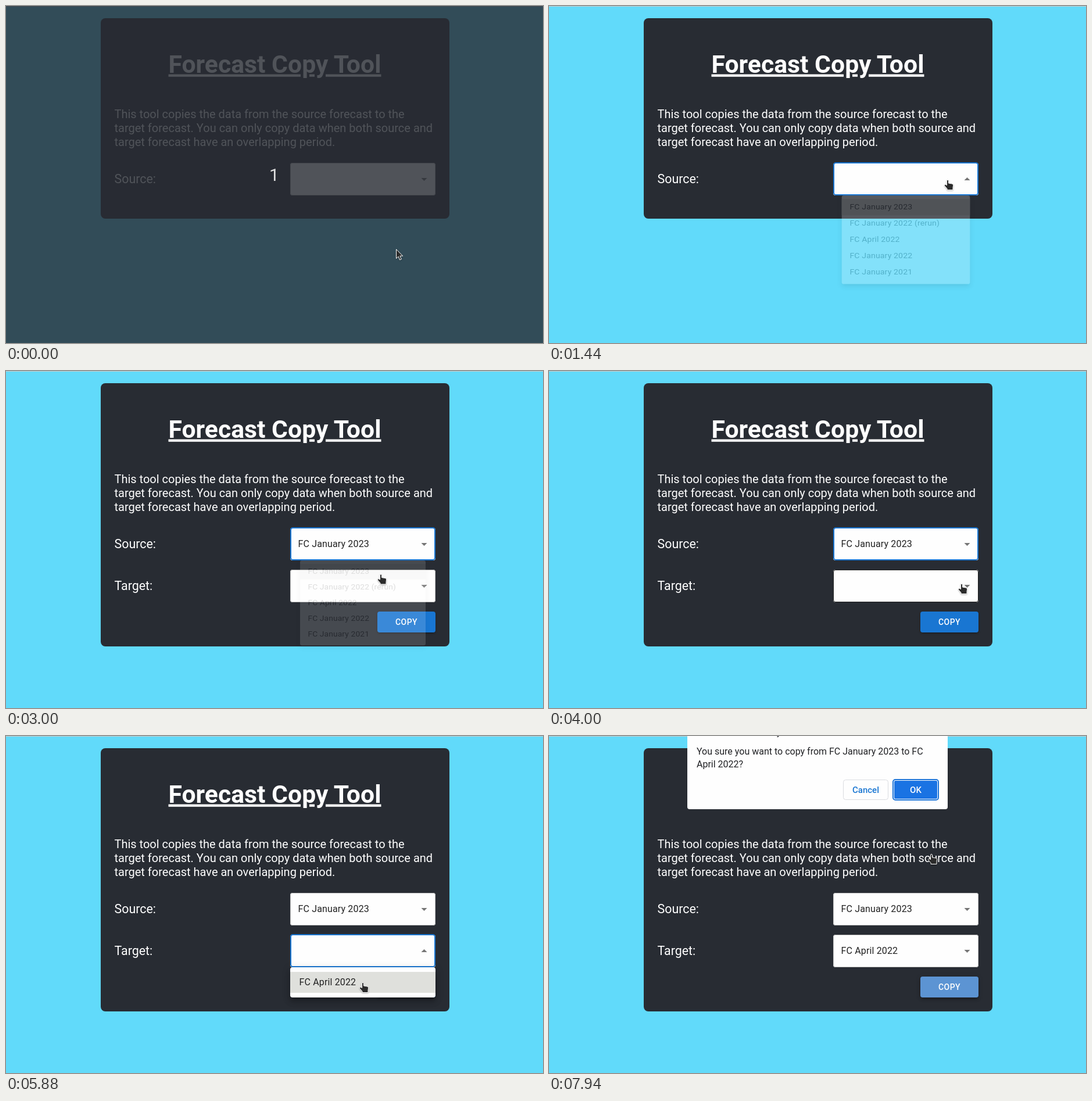
These frames come from a looping animation (924x580 px, 8000 ms). An HTML page:

```html
<!DOCTYPE html>
<html lang="en">
<head>
<meta charset="utf-8">
<title>Forecast Copy Tool</title>
<style>
  html, body { margin: 0; width: 100%; height: 100%; overflow: hidden; background: #61dafa; }
  svg { display: block; width: 924px; height: 580px; font-family: Roboto, sans-serif; }
  text { white-space: pre; }
  .field { font-size: 16px; letter-spacing: .15px; fill: #212121; }
  .label { font-size: 21.4px; fill: #fefefe; }
  .medium { font-weight: 500; }
</style>
</head>
<body>
<svg id="stage" viewBox="0 0 924 580" xmlns="http://www.w3.org/2000/svg"></svg>
<script>
const TICK = 62.5, LOOP = 8000;
const NS = 'http://www.w3.org/2000/svg';
const stage = document.getElementById('stage');

function add(parent, tag, attrs = {}, content) {
  const el = document.createElementNS(NS, tag);
  set(el, attrs);
  if (content) el.textContent = content;
  parent.appendChild(el);
  return el;
}
function set(el, attrs) {
  for (const k in attrs) el.setAttribute(k, attrs[k]);
}
const show = (el, on) => set(el, { visibility: on ? 'visible' : 'hidden' });
const group = (parent = stage) => add(parent, 'g');
const rect = (p, x, y, width, height, fill, rx = 0, more = {}) =>
  add(p, 'rect', { x, y, width, height, fill, rx, ...more });
const text = (p, x, y, str, attrs) => add(p, 'text', { x, y, ...attrs }, str);

// Each layer: y offset, blur, spread, alpha
function shadow(p, x, y, w, h, layers) {
  for (const [dy, blur, grow, alpha] of layers)
    rect(p, x - grow, y + dy - grow, w + 2 * grow, h + 2 * grow, '#000', 4,
      { opacity: alpha, style: `filter:blur(${blur / 2}px)` });
}

function bezier(x1, y1, x2, y2) {
  const at = (a, b, s) => 3 * a * s * (1 - s) ** 2 + 3 * b * s * s * (1 - s) + s ** 3;
  return x => {
    if (x <= 0) return 0;
    if (x >= 1) return 1;
    let lo = 0, hi = 1;
    for (let i = 0; i < 24; i++) {
      const mid = (lo + hi) / 2;
      if (at(x1, x2, mid) < x) lo = mid; else hi = mid;
    }
    return at(y1, y2, lo);
  };
}
const ease = bezier(.4, 0, .2, 1);
const clamp = v => Math.max(0, Math.min(1, v));

// Page and card
rect(stage, 0, 0, 924, 580, '#61dafa');
rect(stage, 0, 0, 924, 1, '#c8cbcb');
const card = rect(stage, 163, 21, 600, 345, '#282c33', 8);
text(stage, 462.5, 114.5, 'Forecast Copy Tool', {
  'font-size': 42.7, 'font-weight': 700, fill: '#fefefe',
  'text-anchor': 'middle', 'text-decoration': 'underline'
});
[
  'This tool copies the data from the source forecast to the',
  'target forecast. You can only copy data when both source and',
  'target forecast have an overlapping period.'
].forEach((line, i) => text(stage, 186.5, 193 + 24 * i, line, { 'font-size': 20, fill: '#fefefe' }));

function makeSelect(parent, y, label, value) {
  text(parent, 186.5, y + 35, label, { class: 'label' });
  rect(parent, 489, y, 250, 56, '#fefefe', 4);
  const border = rect(parent, 489.5, y + .5, 249, 55, 'none', 3.5);
  const caption = text(parent, 502.5, y + 33, value, { class: 'field' });
  const arrow = add(parent, 'path', { d: 'M-5-2.5h10l-5 5z', fill: '#757575' });
  return ({ focus, hover, open, filled }) => {
    set(border, focus
      ? { x: 490, y, width: 248, height: 55, stroke: '#1976d2', 'stroke-width': 2 }
      : { x: 489.5, y: y + .5, width: 249, height: 55, stroke: hover ? '#212121' : '#c4c4c4', 'stroke-width': 1 });
    show(caption, filled);
    set(arrow, { transform: `translate(719.5 ${y + (open ? 27.5 : 28.5)}) rotate(${open ? 180 : 0})` });
  };
}
const sourceSelect = makeSelect(stage, 270, 'Source:', 'FC January 2023');
const targetRow = group();
const targetSelect = makeSelect(targetRow, 342, 'Target:', 'FC April 2022');

// Copy button
const restShadow = group(targetRow), hoverShadow = group(targetRow);
shadow(restShadow, 639, 414, 100, 36, [[3, 1, -2, .2], [2, 2, 0, .14], [1, 5, 0, .12]]);
shadow(hoverShadow, 639, 414, 100, 36, [[2, 4, -1, .2], [4, 5, 0, .14], [1, 10, 0, .12]]);
const button = rect(targetRow, 639, 414, 100, 36, '#1976d2', 4);
const clip = add(add(stage, 'defs'), 'clipPath', { id: 'button' });
rect(clip, 639, 414, 100, 36, '#000', 4);
const ripple = add(add(targetRow, 'g', { 'clip-path': 'url(#button)' }), 'circle',
  { cx: 687, cy: 424, fill: '#fff' });
text(targetRow, 689, 437, 'COPY', {
  class: 'medium', 'font-size': 14, 'letter-spacing': .4, fill: '#fefefe', 'text-anchor': 'middle'
});

// Dropdown menus
function makeMenu(y, items, [openAt, closeAt], firstClosing) {
  const h = items.length * 36 + 16;
  const c = h / 36, span = (4 + 15 * c ** .25 + c / 5) * 10;
  const g = group();
  shadow(g, 489, y, 250, h, [[5, 5, -3, .2], [8, 10, 1, .14], [3, 14, 2, .12]]);
  rect(g, 489, y, 250, h, '#fefefe', 4);
  rect(g, 489, y + 8, 250, 36, '#dfe0dc');
  items.forEach((s, i) => text(g, 504.5, y + 31 + 36 * i, s, { class: 'field' }));
  return t => {
    const closing = t >= firstClosing * TICK;
    const dt = t - (closing ? closeAt : openAt);
    const fade = ease(clamp(dt / span));
    const move = ease(clamp((closing ? dt - span / 3 : dt) / (span * .666)));
    const k = closing ? 1 - .25 * move : .75 + .25 * move;
    const opacity = closing ? 1 - fade : fade;
    show(g, t >= openAt && opacity > 0);
    set(g, { opacity, transform: `translate(614 ${y}) scale(${k} ${k * k}) translate(-614 ${-y})` });
  };
}
const sourceMenu = makeMenu(326,
  ['FC January 2023', 'FC January 2022 (rerun)', 'FC April 2022', 'FC January 2022', 'FC January 2021'],
  [1370, 2838], 47);
const targetMenu = makeMenu(398, ['FC April 2022'], [4090, 5960], 96);

// Confirm dialog
const dialog = group();
rect(dialog, 238, -10, 448, 136, '#fefefe', 4);
const dialogText = { 'font-size': 16, fill: '#202124' };
text(dialog, 375, -1, 'says', dialogText);
text(dialog, 254, 32, 'You sure you want to copy from FC January 2023 to FC', dialogText);
text(dialog, 254, 54, 'April 2022?', dialogText);
rect(dialog, 506.5, 75.5, 77, 34, '#fefefe', 4, { stroke: '#dadce0' });
rect(dialog, 592, 75, 78, 35, '#fefefe', 4, { stroke: '#1a73d8', 'stroke-width': 2 });
rect(dialog, 594, 77, 74, 31, '#1a73e3', 2);
const action = { class: 'medium', 'font-size': 15, 'text-anchor': 'middle' };
text(dialog, 545, 98, 'Cancel', { ...action, fill: '#1976d2' });
text(dialog, 631, 98, 'OK', { ...action, fill: '#fefefe' });

// Countdown veil
const veil = group();
rect(veil, 0, 0, 924, 580, '#282c33', 0, { opacity: .81 });
text(veil, 461.5, 300.5, '1', { 'font-size': 30, fill: '#e0e0e0', 'text-anchor': 'middle' });

// Pointer
const pointer = add(stage, 'g', {
  stroke: '#fefefe', 'stroke-linejoin': 'round', fill: '#2b2b2b',
  style: 'filter:drop-shadow(0 1px 1px rgba(0,0,0,.3))'
});
const arrowShape = add(pointer, 'path', { d: 'M.5.7V16.6L4.1 13.2 6.6 19 9.4 17.8 6.9 12.2H11.7Z' });
const handShape = add(pointer, 'path', {
  d: 'M-1.5 9.5V1.8Q-1.5.4 0 .4T1.5 1.8V6L7.5 7Q9.7 7.4 9.6 9.4L9 14V17.5H-1V15.5L-5.3 10.5' +
     'Q-6 9-4.6 8.4Q-3.6 8-1.5 9.5Z'
});

const track = [ // tick, x, y
  [0, 671, 418], [6, 671, 418], [11, 688, 359], [17, 686, 299], [30, 686, 299], [31, 686, 305],
  [40, 645, 349.5], [55, 645, 349.5], [63, 710, 366], [75, 710, 366], [76, 709, 363.5],
  [83, 614, 431], [88, 614, 426], [89, 614, 426], [90, 614, 424], [104, 614, 424],
  [108, 687, 422.5], [119, 687, 422.5], [123, 677, 335], [127, 658, 203], [128, 658, 203]
];
function pointerAt(n) {
  const i = Math.max(1, track.findIndex(k => k[0] >= n));
  const [t0, x0, y0] = track[i - 1], [t1, x1, y1] = track[i];
  const f = (n - t0) / (t1 - t0);
  return [x0 + (x1 - x0) * f, y0 + (y1 - y0) * f];
}

function draw(ms) {
  const n = Math.floor((ms + 2.5) / TICK) % 128;
  const t = n * TICK;
  const within = (a, b) => n >= a && n < b;

  show(veil, n === 0);
  set(card, { height: n < 47 ? 345 : 453 });
  show(targetRow, n >= 47);
  targetRow.style.display = n >= 47 ? '' : 'none';

  sourceSelect({ focus: within(22, 66), hover: within(14, 22), open: within(22, 47), filled: n >= 47 });
  targetSelect({ focus: within(66, 110), hover: within(56, 66), open: within(66, 96), filled: n >= 96 });
  sourceMenu(t);
  targetMenu(t);

  const hover = ease(clamp((n - 106) / 4));
  const mix = (a, b) => Math.round(a + (b - a) * hover);
  set(button, { fill: `rgb(${mix(25, 21)},${mix(118, 101)},${mix(210, 192)})` });
  set(restShadow, { opacity: 1 - hover });
  set(hoverShadow, { opacity: hover });
  const press = ease(clamp((n - 109) / 5));
  set(ripple, { r: 60 * press, opacity: .1 + .2 * press });

  show(dialog, n >= 117);

  const [x, y] = pointerAt(n);
  const hand = within(14, 31) || within(37, 76) || (n >= 81 && n !== 105);
  set(pointer, { transform: `translate(${x} ${y})` });
  show(arrowShape, !hand);
  show(handShape, hand);
}

const start = performance.now();
function frame() {
  draw((performance.now() - start) % LOOP);
  requestAnimationFrame(frame);
}
draw(0);
requestAnimationFrame(frame);
</script>
</body>
</html>
```
